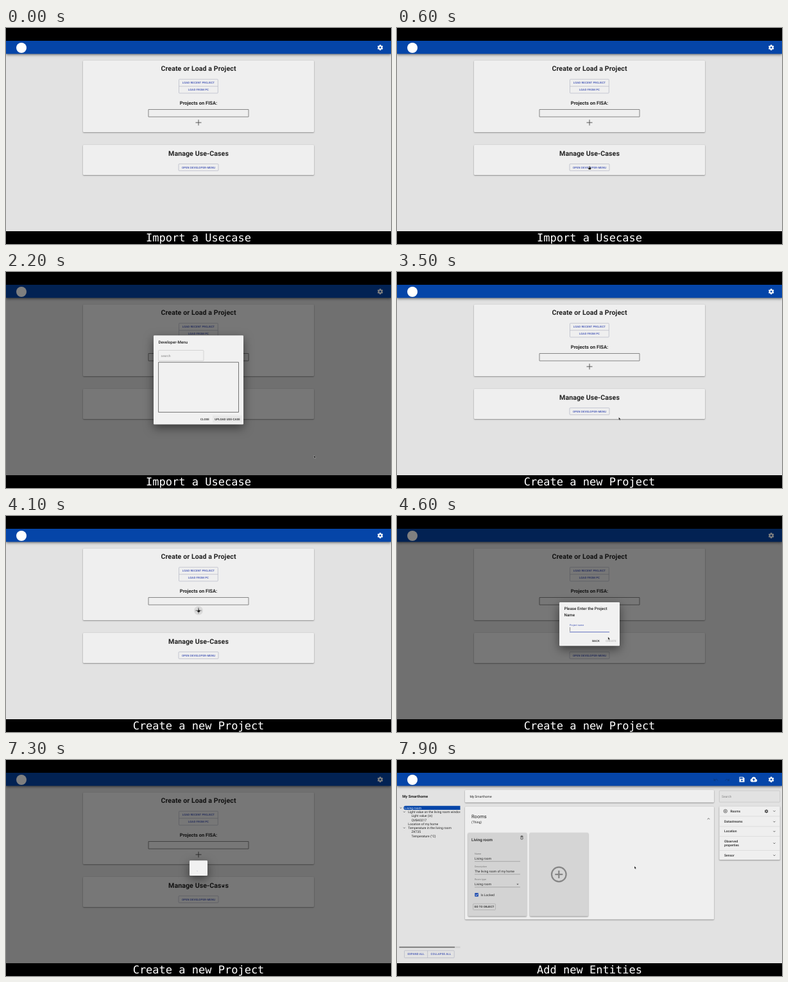
An HTML page with a canvas that plays this animation: 600x338 px, repeating every 8 s.

```html
<!DOCTYPE html>
<html lang="en">
<head>
<meta charset="utf-8">
<title>Usecase walkthrough</title>
<style>
html, body { margin: 0; width: 100%; height: 100%; overflow: hidden; background: #000; }
canvas { display: block; width: 600px; height: 338px; }
</style>
</head>
<body>
<canvas id="stage" width="600" height="338"></canvas>
<script>
const ctx = document.getElementById('stage').getContext('2d');
ctx.textRendering = 'geometricPrecision';
const LOOP = 8000;
const BLUE = '#0545a8', INDIGO = '#4053b4', INK = '#222', GREY = '#777';
const ROBOTO = 'Roboto, sans-serif', NOTO = '"Noto Sans", sans-serif';
const BUTTON = 4.375;

const clamp = v => Math.max(0, Math.min(1, v));
const ease = v => v * v * (3 - 2 * v);
const ramp = (t, start, length) => ease(clamp((t - start) / length));
const between = (t, a, b) => t >= a && t < b;

function text(str, x, y, size, { color = INK, weight = 400, align = 'left', family = ROBOTO, spacing = 0 } = {}) {
  ctx.font = `${weight} ${size}px ${family}`;
  ctx.letterSpacing = `${spacing}px`;
  ctx.textAlign = align;
  ctx.fillStyle = color;
  ctx.fillText(str, x, y);
}

function rect(x, y, x2, y2, fill) {
  ctx.fillStyle = fill;
  ctx.fillRect(x, y, x2 - x, y2 - y);
}

function frame(x, y, x2, y2, color, width = 0.7, radius = 1) {
  ctx.beginPath();
  ctx.roundRect(x, y, x2 - x, y2 - y, radius);
  ctx.strokeStyle = color;
  ctx.lineWidth = width;
  ctx.stroke();
}

function card(x, y, x2, y2, fill = '#efefef', blur = 2, drop = 0.8, alpha = 0.45, radius = 1.2) {
  ctx.save();
  ctx.shadowColor = `rgba(0,0,0,${alpha})`;
  ctx.shadowBlur = blur;
  ctx.shadowOffsetY = drop;
  ctx.beginPath();
  ctx.roundRect(x, y, x2 - x, y2 - y, radius);
  ctx.fillStyle = fill;
  ctx.fill();
  ctx.restore();
}

function line(points, color, width = 0.7) {
  ctx.beginPath();
  for (let i = 0; i < points.length; i += 2) ctx.lineTo(points[i], points[i + 1]);
  ctx.strokeStyle = color;
  ctx.lineWidth = width;
  ctx.stroke();
}

function shape(points, fill) {
  ctx.beginPath();
  for (let i = 0; i < points.length; i += 2) ctx.lineTo(points[i], points[i + 1]);
  ctx.closePath();
  ctx.fillStyle = fill;
  ctx.fill();
}

function ring(x, y, r, color, width) {
  ctx.beginPath();
  ctx.arc(x, y, r, 0, 7);
  ctx.strokeStyle = color;
  ctx.lineWidth = width;
  ctx.stroke();
}

function disc(x, y, r, color) {
  ctx.beginPath();
  ctx.arc(x, y, r, 0, 7);
  ctx.fillStyle = color;
  ctx.fill();
}

function plus(x, y, r, color, width) {
  line([x - r, y, x + r, y], color, width);
  line([x, y - r, x, y + r], color, width);
}

function chevron(x, y, r = 1.6, dir = 1, color = '#444') {
  line([x - r, y - r * dir / 2, x, y + r * dir / 2, x + r, y - r * dir / 2], color, 0.8);
}

function gear(x, y, r, color) {
  ring(x, y, r * 0.56, color, r * 0.45);
  for (let i = 0; i < 6; i++) {
    const a = Math.PI / 6 + i * Math.PI / 3, c = Math.cos(a), s = Math.sin(a);
    line([x + c * r * 0.6, y + s * r * 0.6, x + c * r, y + s * r], color, r * 0.5);
  }
}

const label = (str, x, y, color = INK, align = 'center') =>
  text(str, x, y, BUTTON, { color, align, weight: 500, spacing: 0.12 });

function header() {
  card(0, 20, 600, 40.6, BLUE, 4, 1, 0.5, 0);
  disc(24, 31, 8, '#fff');
  gear(583.2, 30.6, 4.4, '#fff');
}

function home(hoverPlus) {
  rect(0, 20, 600, 318, '#e2e2e2');
  header();
  card(120, 51, 480, 163);
  const title = { weight: 700, align: 'center', spacing: 0.08 };
  text('Create or Load a Project', 300, 66.6, 10.625, title);
  frame(269.5, 80.2, 330.3, 102, '#b4b6c4');
  line([269.5, 91.2, 330.3, 91.2], '#b4b6c4');
  label('LOAD RECENT PROJECT', 300, 87.2, INDIGO);
  label('LOAD FROM PC', 300, 98.2, INDIGO);
  text('Projects on FISA:', 300, 119.8, 7.5, { weight: 700, align: 'center' });
  frame(222, 127.5, 378, 139, '#858585', 1, 0);
  if (hoverPlus) disc(300, 148, 7, '#dadada');
  plus(300, 148, 4.5, '#555', 1);
  card(120, 183, 480, 230);
  text('Manage Use-Cases', 300, 199.6, 10.625, title);
  frame(269, 212.7, 331, 223.3, '#b4b6c4');
  label('OPEN DEVELOPER-MENU', 300, 219.7, INDIGO);
}

function modal(alpha, x, y, x2, y2, content) {
  if (alpha <= 0) return;
  ctx.save();
  ctx.globalAlpha = alpha;
  rect(0, 20, 600, 318, 'rgba(0,0,0,.5)');
  card(x, y, x2, y2, '#f1f1f1', 15, 5, 0.5);
  content();
  ctx.restore();
}

function developerMenu(uploadFocus) {
  text('Developer-Menu', 237.4, 111.7, 6.25, { weight: 500 });
  frame(237.5, 122.5, 308, 139, '#c8c8c8');
  text('search', 241.6, 132.6, 5, { color: '#888' });
  frame(237.6, 141.2, 362.5, 219.4, '#555', 0.8, 0);
  if (uploadFocus) rect(322, 224.5, 368, 235.5, 'rgba(0,0,0,.04)');
  label('CLOSE', 310, 231.6);
  label('UPLOAD USE-CASE', 345, 231.6);
}

function nameForm(t) {
  const name = 'My Smarthome';
  const count = Math.floor(clamp((t - 5650) / 720) * name.length);
  const typed = name.slice(0, count);
  text('Please Enter the Project', 260.5, 147.2, 6.25, { weight: 500 });
  text('Name', 260.5, 157.2, 6.25, { weight: 500 });
  text('Project name', 269, 171.6, 3.75, { color: INDIGO });
  text(typed, 269, 179.4, 5);
  const caretX = 269.6 + ctx.measureText(typed).width;
  const typing = between(t, 5650, 6500);
  if (typing || Math.floor((t - 4300) / 530) % 2 === 0) line([caretX, 174, caretX, 180.4], '#333', 0.5);
  line([269, 181.6, 331, 181.6], INDIGO, 0.8);
  label('BACK', 310, 196.5);
  label('CREATE', 333.5, 196.5, count ? INK : '#b5b5b5');
}

function spinner(t) {
  const a = t / 220;
  ctx.beginPath();
  ctx.arc(300, 169.3, 5, a, a + 0.4);
  ctx.strokeStyle = '#c4c6d8';
  ctx.lineWidth = 0.8;
  ctx.stroke();
}

const FILES = [
  ['imgs', '', '', '11:37'],
  ['system-tests', '', '', '16 Sep'],
  ['fisa-frontend', '', '', '16 Sep'],
  ['fisa-backend', '', '', '10 Sep'],
  ['examples', '', '', '10 Sep'],
  ['smarhome-usecase.json', '14.1 kB', 'Program', '17 Sep'],
  ['geckodriver.log', '3.0 kB', 'Text', '16 Sep'],
  ['README.md', '3.0 kB', 'Text', '15 Sep'],
  ['fisa-logo.svg', '21.5 kB', 'Image', '15 Sep'],
  ['run-tests.sh', '119 bytes', 'Program', '10 Sep'],
  ['docker-compose.yml', '1.3 kB', 'Text', '10 Sep'],
  ['docker-compose.ci.yml', '1.2 kB', 'Text', '10 Sep'],
  ['LICENSE', '1.1 kB', 'Text', '10 Sep'],
  ['Dockerfile', '568 bytes', 'Text', '10 Sep'],
];

function fileIcon(i, y) {
  if (i < 5) {
    line([113, y - 2, 115, y - 2, 115.8, y - 1.2, 118, y - 1.2, 118, y + 2.2, 113, y + 2.2, 113, y - 2], '#ccc', 0.8);
  } else if (i === 5) {
    text('{ }', 115.5, y + 1.8, 5, { color: '#777', align: 'center', family: NOTO });
  } else if (i === 7) {
    text('M↓', 115.5, y + 1.4, 4, { color: '#bbb', align: 'center', weight: 700, family: NOTO });
  } else if (i === 8) {
    rect(112, y - 1.5, 119, y + 2, '#1b1b1b');
  } else if (i === 10 || i === 11) {
    rect(113, y - 4, 120, y + 4, '#e6e3dc');
    for (let k = -2; k <= 2; k += 2) line([114.5, y + k, 118.5, y + k], '#a8a49c', 0.6);
  } else {
    rect(113.2, y - 2.6, 117.8, y + 2.6, '#484848');
    for (let k = -1; k <= 1; k++) line([114, y + k * 1.4, 117, y + k * 1.4], '#888', 0.4);
  }
}

function fileChooser(t, mouse) {
  rect(0, 0, 600, 338, '#000');
  rect(110, 0, 490, 338, '#222');
  const light = { color: '#d2d2d2', family: NOTO };
  const columns = [122, 398.5, 430, 459];
  ['Name', 'Size', 'Type', 'Modified'].forEach((s, i) => text(s, i ? columns[i] : 112, 9, 5.5, light));
  shape([481, 6, 484.4, 6, 482.7, 8.2], '#ccc');
  line([110, 12.8, 490, 12.8], '#181818');
  const selected = t < 1500 ? 0 : 5;
  FILES.forEach((row, i) => {
    const y = 18.1 + i * 9.83;
    const hovered = Math.abs(mouse.y + 1 - y) < 4.9;
    if (i === selected) {
      rect(110, y - 4.8, 489.5, y + 4.8, '#253b57');
      frame(110.5, y - 4.4, 489, y + 4.4, '#45648c', 0.6, 0);
    } else if (hovered) {
      rect(110, y - 4.8, 489.5, y + 4.8, '#333');
    }
    fileIcon(i, y);
    row.forEach((s, c) => text(s, columns[c], y + 1.9, 5.5, light));
  });
  line([110, 305.3, 490, 305.3], '#303030');
  text('All Files', 459, 315, 5.5, { color: '#aaa', family: NOTO });
  shape([481, 312, 484.4, 312, 482.7, 314.2], '#aaa');
  rect(110, 321, 490, 338, '#1d1d1d');
  card(407, 323, 446, 335.4, '#333', 0, 0, 0);
  card(448.5, 323, 488, 335.4, '#333', 0, 0, 0);
  disc(417.8, 329, 2.6, '#ccc');
  line([416.7, 327.9, 418.9, 330.1], '#333');
  line([418.9, 327.9, 416.7, 330.1], '#333');
  text('Cancel', 421.5, 331.2, 5.5, light);
  shape([461, 326, 463, 329, 459, 329], '#ccc');
  line([458, 329, 458, 331.5, 464, 331.5, 464, 329], '#ccc');
  text('Open', 465.5, 331.2, 5.5, light);
}

function headerTools() {
  const faint = '#083a86';
  for (const [x, d] of [[497, -1], [514.5, 1]]) {
    line([x - 3 * d, 32.5, x - d, 29.8, x + 2.5 * d, 31.5], faint, 1);
    shape([x + 3.5 * d, 28.8, x + 3.5 * d, 32.8, x, 32.8], faint);
  }
  shape([533.5, 26.5, 539.5, 26.5, 541.5, 28.5, 541.5, 34.5, 533.5, 34.5], '#fff');
  rect(534.5, 27.5, 538.8, 29.5, BLUE);
  disc(537.5, 32, 1.3, BLUE);
  disc(553.4, 31.7, 2.6, '#fff');
  disc(556, 29.8, 3.2, '#fff');
  disc(559, 32, 2.3, '#fff');
  rect(553.4, 31, 559, 34.3, '#fff');
  shape([556, 28.7, 558.2, 31, 553.8, 31], BLUE);
  rect(555.2, 31, 556.8, 32.8, BLUE);
}

const TREE = [
  ['Living room', 0, true],
  ['Light value on the living room window', 1, true],
  ['Light value (in)', 2],
  ['QVB40217', 2],
  ['Location of my home', 1],
  ['Temperature in the living room', 1, true],
  ['ZKT35', 2],
  ['Temperature (°C)', 2],
];

function sidebar() {
  text('My Smarthome', 8.2, 59.2, 5.8, { weight: 700 });
  ctx.save();
  ctx.beginPath();
  ctx.rect(0, 66, 98.5, 60);
  ctx.clip();
  card(10.5, 71.8, 104, 78, BLUE, 0, 0, 0, 2.5);
  TREE.forEach(([name, depth, open], i) => {
    const y = 75 + i * 6.25;
    if (open) chevron(6 + depth * 5.4, y, 1.3);
    text(name, 12 + depth * 5.2, y + 1.8, 5, { color: i ? INK : '#e8eefa' });
  });
  ctx.restore();
  rect(3.5, 291.7, 98.5, 294.3, '#cfcfcf');
  rect(3.5, 291.9, 90, 294, '#858585');
  frame(11.5, 298.2, 89.2, 309.6, '#b4b6c4');
  line([47.6, 298.2, 47.6, 309.6], '#b4b6c4');
  label('EXPAND ALL', 29.6, 305.4, INDIGO);
  label('COLLAPSE ALL', 68.4, 305.4, INDIGO);
}

function roomCard() {
  card(110.8, 114, 202, 244.5, '#d3d3d3');
  text('Living room', 116, 126.8, 6.25, { weight: 500 });
  line([192.3, 119.4, 196.7, 119.4], '#444', 0.8);
  line([193.6, 118.6, 195.4, 118.6], '#444', 0.8);
  frame(193, 120.4, 196, 124, '#444', 0.8, 0.3);
  const fields = [['Name', 'Living room'], ['Description', 'The living room of my home'], ['Room type', 'Living room']];
  fields.forEach(([name, value], i) => {
    const y = 148.2 + i * 20.1;
    text(name, 121, y, 3.75, { color: GREY });
    text(value, 121, y + 7.8, 5);
    line([121, y + 10.5, 192, y + 10.5], '#888', 0.6);
  });
  shape([186.3, 193.7, 189.7, 193.7, 188, 195.5], '#555');
  card(121.2, 208, 126.9, 213.8, '#2450b0', 0, 0, 0, 0.7);
  line([122.4, 211, 123.6, 212.2, 125.9, 209.6], '#fff', 0.8);
  text('Is Locked', 130.6, 212.8, 5);
  frame(118.6, 225, 153.5, 234.6, '#aaa');
  label('GO TO OBJECT', 136, 231.4);
}

function entities() {
  rect(0, 20, 600, 318, '#e2e2e2');
  header();
  headerTools();
  sidebar();
  card(106, 47, 494, 66.5);
  text('My Smarthome', 113.4, 58.8, 5);
  card(106, 73, 494, 249.4);
  text('Rooms', 116, 91.2, 7.5);
  text('(Thing)', 116, 98.7, 5);
  chevron(485.5, 92, 1.8, -1);
  roomCard();
  card(207, 114, 298, 244.5, '#d5d5d5');
  ring(252.3, 179, 11.3, '#868686', 2.2);
  plus(252.3, 179, 6, '#868686', 2.2);

  frame(502.3, 48, 596.8, 66, '#c2c2c2');
  text('Search', 506, 58.9, 5, { color: '#888' });
  card(502.3, 72.5, 596.8, 156.3);
  ring(511.8, 80, 2.7, '#444', 0.7);
  plus(511.8, 80, 1.4, '#444', 0.7);
  gear(575.7, 80.3, 2.8, '#444');
  text('Rooms', 519.4, 81.6, 5, { weight: 500 });
  text('Datastreams', 510, 98.2, 5, { weight: 500 });
  text('Location', 510, 113.3, 5, { weight: 500 });
  text('Observed', 510, 128.7, 5, { weight: 500 });
  text('properties', 510, 135.4, 5, { weight: 500 });
  text('Sensor', 510, 150.9, 5, { weight: 500 });
  for (const y of [80, 96.5, 111.7, 130.3, 149.2]) chevron(588, y, 1.5);
  for (const y of [88, 104, 119.4, 141.5]) line([502.3, y, 596.8, y], '#d2d2d2', 0.6);
}

// Pointer route: [time, x, y]
const ROUTE = [
  [100, 400, 290], [500, 300, 218], [700, 300, 218], [950, 354, 229], [1150, 354, 229],
  [1200, 190, 93], [1420, 165, 67], [1580, 165, 67], [1950, 468, 328], [2050, 468, 328],
  [2150, 480, 287], [2250, 480, 287], [2700, 310, 230], [2900, 310, 230],
  [3400, 350, 235], [3950, 300, 147], [4300, 300, 147], [4900, 357.5, 231],
  [6550, 357.5, 231], [6880, 338, 196], [7500, 338, 196], [7800, 370, 166], [LOOP, 370, 166],
];

function pointerAt(t) {
  const next = ROUTE.findIndex(p => p[0] > t);
  if (next < 1) return { x: 400, y: 290 };
  const [t0, x0, y0] = ROUTE[next - 1], [t1, x1, y1] = ROUTE[next];
  const k = ease((t - t0) / (t1 - t0));
  return { x: x0 + (x1 - x0) * k, y: y0 + (y1 - y0) * k };
}

function drawPointer({ x, y }, hand) {
  const outline = hand
    ? [x - 0.5, y - 2, x + 0.7, y - 2, x + 0.8, y, x + 2.6, y + 0.8, x + 2, y + 3.6, x - 1.2, y + 3.6, x - 2.6, y + 0.8, x - 0.5, y + 1]
    : [x, y, x, y + 4.3, x + 1, y + 3.5, x + 1.8, y + 5, x + 2.5, y + 4.6, x + 1.8, y + 3.2, x + 3, y + 3];
  shape(outline, '#111');
  line([...outline, outline[0], outline[1]], 'rgba(255,255,255,.75)', 0.4);
}

function captionAt(t) {
  if (t < 3300) return 'Import a Usecase';
  return t < 7500 ? 'Create a new Project' : 'Add new Entities';
}

function draw(t) {
  const mouse = pointerAt(t);
  const choosing = between(t, 1200, 2100);
  rect(0, 0, 600, 338, '#000');
  if (choosing) {
    fileChooser(t, mouse);
  } else {
    ctx.save();
    ctx.beginPath();
    ctx.rect(0, 20, 600, 298);
    ctx.clip();
    if (t < 7500) {
      home(between(t, 3900, 4300));
      const menu = ramp(t, 620, 225) - ramp(t, 2830, 195);
      modal(menu, 230, 99.3, 370, 238.5, () => developerMenu(t > 950));
      const form = ramp(t, 4300, 225) * (t < 7050);
      modal(form, 253, 135, 347, 203.3, () => nameForm(t));
      modal(+(t >= 7050), 286, 157.3, 314, 181, () => spinner(t));
    } else {
      entities();
    }
    ctx.restore();
  }
  const hand = between(t, 450, 650) || between(t, 930, 1200) || between(t, 2650, 2900)
    || between(t, 3900, 4350) || between(t, 6850, 7500);
  if (t >= 100 && !between(t, 3200, 3400)) drawPointer(mouse, hand);
  text(captionAt(t), 300, 334, 17, { color: '#fff', align: 'center', family: '"DejaVu Sans Mono", monospace' });
}

function tick() {
  draw(performance.now() % LOOP);
  requestAnimationFrame(tick);
}
tick();
</script>
</body>
</html>
```
